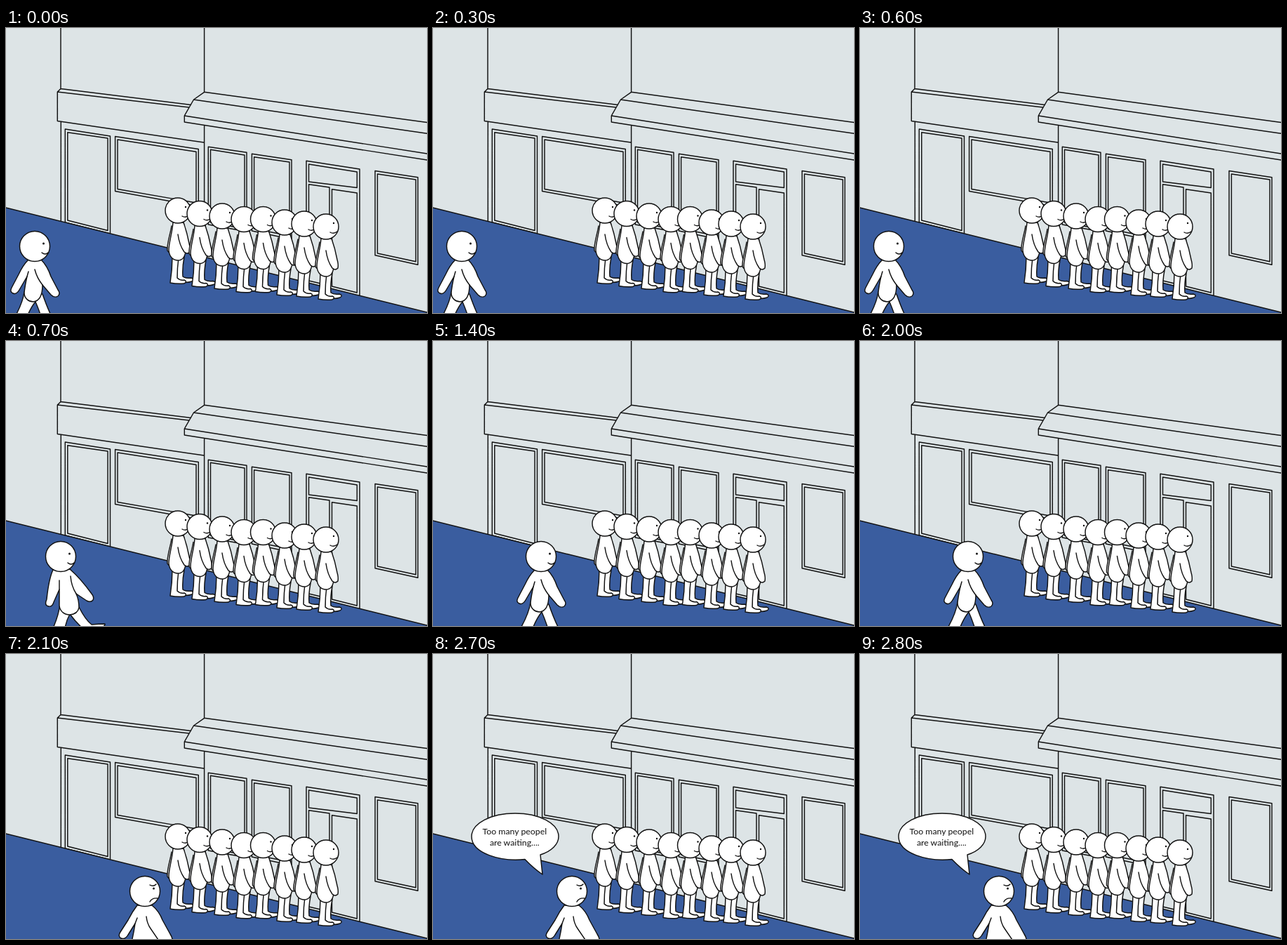
Recreate the animation shown at these times as an HTML page. Size 600x406 px, loop 3.7 s.

```html
<!DOCTYPE html>
<html lang="en">
<head>
<meta charset="utf-8">
<style>
html, body { margin: 0; width: 100%; height: 100%; overflow: hidden; background: #dde4e6; }
svg { display: block; width: 100%; height: 100%; }
text { font: 12.3px Lato, "Open Sans", sans-serif; text-anchor: middle; fill: #111; stroke: none; }
</style>
</head>
<body>
<svg viewBox="0 0 600 406" fill="none" stroke="#111" stroke-width="1.45" stroke-linejoin="round" stroke-linecap="round">
  <defs>
    <g id="waiter" fill="#fff">
      <path d="M-9 22C-11 34 -16 48 -15 57Q-13 61 -9 59"/>
      <path d="M-1 67Q0 82 -2 101Q11 104 20 101Q25 98 19 96Q11 97 7 94Q6 82 9 66Z"/>
      <path d="M-8 66Q-8 84 -11 103Q-1 105 9 104Q14 101 9 99Q3 100 -1 96Q-1 82 1 67Z"/>
      <path d="M-7 17C-8 32 -13 45 -13 57C-12 67 -6 71 0 71C6 71 10 66 11 58L8 17Z"/>
      <path stroke="none" d="M0 34Q4 50 10 59Q14 63 17 59Q18 54 16 47Q13 31 8 17Z"/>
      <path fill="none" d="M0 34Q2 49 9 59Q13 63 17 59Q18 54 16 47Q13 31 8 17"/>
      <circle r="18"/>
      <circle cx="11" cy="-5" r="1.2" fill="#111" stroke="none"/>
      <path d="M6 8Q11 11 16 7" fill="none"/>
    </g>
    <g id="head" fill="#fff">
      <circle r="21.5"/>
      <circle cx="12.5" cy="-4" r="1.5" fill="#111" stroke="none"/>
    </g>
    <g id="happy">
      <use href="#head"/>
      <path d="M10 9Q15 13 19 9"/>
    </g>
    <g id="stride">
      <path fill="#fff" d="M-15 65Q-17 80 -28 100H-11Q-5 86 1 79Q5 88 9 100H24Q18 88 11 68Z"/>
      <path fill="#fff" d="M-9 19Q-17 27 -23 40L-33 59Q-36 65 -31 67Q-26 69 -22 62L-11 43Q-14 56 -15 66C-15 75 -8 79 -2 79C6 78 11 70 11 55L23 69Q28 74 33 71Q37 67 33 62L23 43Q18 28 9 19Z"/>
      <path d="M0 33Q3 45 11 55M-11 43L-9 36"/>
      <use href="#happy"/>
    </g>
  </defs>

  <path id="wall"/>
  <path d="M-2 255.5L602 405.5V420H-2Z" fill="#3a5d9f"/>
  <g id="queue"></g>

  <use class="pose" href="#stride" x="41" y="311"/>
  <g class="pose" transform="translate(78 307)">
    <path fill="#fff" d="M-1 68Q-3 84 -11 102H6Q8 91 13 82Q21 93 31 102H55Q64 99 63 96Q54 96 44 97Q35 90 26 72Z"/>
    <path fill="#fff" d="M-11 19Q-17 32 -20 61Q-24 70 -17 71Q-12 72 -10 65L-2 47Q-2 59 -2 70C-1 79 6 83 13 83Q24 82 26 73Q26 62 22 53L37 63Q43 66 46 62Q48 58 44 53Q28 31 13 18Z"/>
    <path d="M14 28Q15 42 22 53M-2 47L-2 34"/>
    <use href="#happy"/>
  </g>
  <use class="pose" href="#stride" x="154" y="307"/>
  <g class="pose" transform="translate(198 338)">
    <path fill="#fff" d="M-11 20Q-18 29 -24 41L-35 58Q-39 64 -34 67Q-28 69 -24 62L-14 46Q-16 60 -19 72H39Q40 67 36 61L25 41Q20 28 10 20Z"/>
    <path d="M2 36Q3 46 8 53L21 72M-14 46L-11 38"/>
    <use href="#head"/>
    <path d="M7 -9Q12 -6 16 -10M7 15Q10 9 18 10"/>
  </g>

  <g id="bubble">
    <path fill="#fff" d="M131 292.5C96 296 55 284 55 260C55 241 83 227 117 227S179 241 179 260C179 271 169 281 153 286L156 314Q144 306 131 292.5Z"/>
    <text x="116.3" y="257">Too many peopel</text>
    <text x="116.3" y="272.5">are waiting....</text>
  </g>
</svg>
<script>
const $ = id => document.getElementById(id);

// Upright panel: left, right, then top and bottom heights at each side
const panel = (l, r, tl, tr, bl, br) => `M${l} ${tl}L${r} ${tr}V${br}L${l} ${bl}Z`;

$("wall").setAttribute("d", [
  "M78 0V86.5M78.3 134V275M282.6 0V91M282.6 139V326",
  "M263.5 109.5L78 86.5L73.3 91V132.5L282 163M73.3 91L261 113",
  "M600 134.5L282.6 91.3L267.5 102L600 150.3M267.5 102L254.3 125L600 179M254.3 125V134L600 188",
  panel(84.3, 148.5, 144, 154, 277, 293), panel(87.8, 145, 148.7, 157, 274, 288.5),
  panel(155.6, 274.3, 154.5, 172.5, 232.5, 254), panel(159, 271, 159, 176.3, 229.5, 249),
  panel(288.3, 343, 169.3, 177.3, 280, 290), panel(291.5, 340, 173.3, 181, 277, 286),
  panel(350.4, 407, 179.3, 187.7, 289, 301), panel(353.6, 404, 183.7, 191, 286, 296),
  panel(428, 504, 189.3, 201, 363, 382), panel(431.5, 500.3, 194, 205, 219, 227.5),
  panel(431.5, 461, 222.7, 227, 360, 367), panel(464.5, 500.3, 229.7, 235, 368, 377),
  panel(526, 587, 203.5, 212.7, 323.7, 337.3), panel(529.4, 584, 208, 216, 321, 332.7)
].join(""));

const queue = [[245, 260], [276, 264.5], [308, 268], [339, 272.5], [366.5, 272.5], [397, 277], [425, 279], [456, 283]];
$("queue").innerHTML = queue.map(([x, y]) => `<use href="#waiter" x="${x}" y="${y}"/>`).join("");

const poses = document.querySelectorAll(".pose");
const show = (el, on) => el.style.display = on ? "" : "none";

function draw(now) {
  const t = now % 3700;
  const step = Math.min(3, Math.floor(t / 700));
  poses.forEach((pose, i) => show(pose, i === step));
  show($("bubble"), t >= 2700);
}

const start = performance.now();
const tick = () => {
  draw(performance.now() - start);
  requestAnimationFrame(tick);
};
tick();
</script>
</body>
</html>
```
